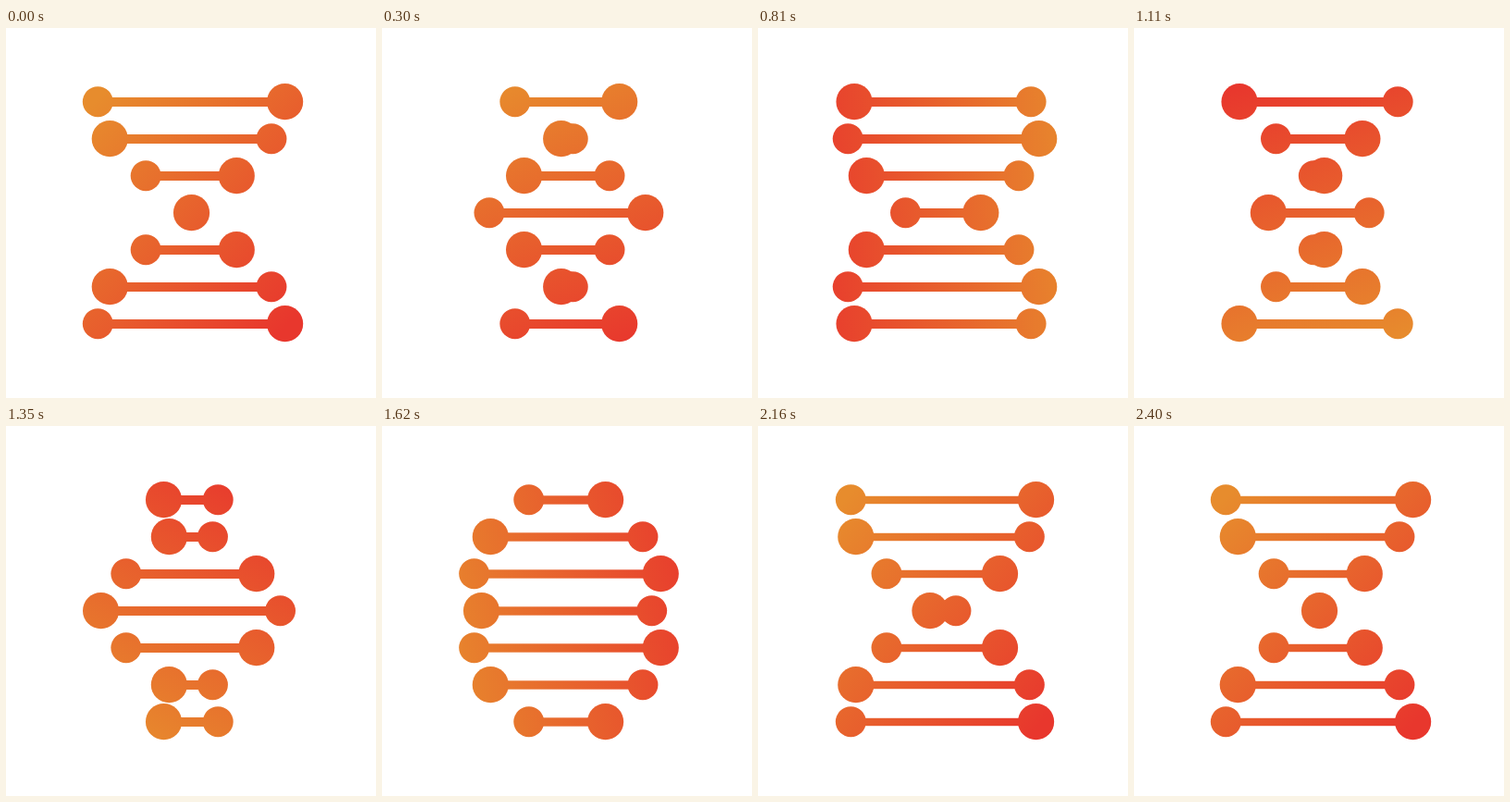
These frames come from a looping animation (400 px wide and 400 px high, 4460 ms). An HTML page with a canvas:

```html
<!DOCTYPE html>
<html lang="en">
<head>
<meta charset="utf-8">
<title>Turning helix</title>
<style>
  html, body { margin: 0; width: 100%; height: 100%; overflow: hidden; background: #fff; }
  canvas { display: block; width: 400px; height: 400px; }
</style>
</head>
<body>
<canvas id="stage" width="400" height="400"></canvas>
<script>
const ctx = document.getElementById('stage').getContext('2d');
const LOOP = 4460, TURN = 2400, STEP = 30;
const RAD = Math.PI / 180;
const BIG = 19.6, SMALL = 16.5;
const TWIST = [0, 30.3, 61, 90.3]; // degrees, outer row to middle row

const clamp = v => Math.min(1, Math.max(0, v));

function bezier(x1, y1, x2, y2) {
  const at = (s, a, b) => 3 * (1 - s) ** 2 * s * a + 3 * (1 - s) * s * s * b + s ** 3;
  return x => {
    if (x <= 0 || x >= 1) return clamp(x);
    let lo = 0, hi = 1;
    for (let i = 0; i < 30; i++) {
      const mid = (lo + hi) / 2;
      if (at(mid, x1, x2) < x) lo = mid; else hi = mid;
    }
    return at(lo, y1, y2);
  };
}

const spin = bezier(0.167, 0.179, 0.683, 1);
const sweep = bezier(0.28, 0, 0.49, 1);

function tint(angle) {
  const dx = 158 * Math.cos(angle * RAD), dy = 158 * Math.sin(angle * RAD);
  const g = ctx.createLinearGradient(200 - dx, 200 - dy, 200 + dx, 200 + dy);
  g.addColorStop(0, '#e78c2d');
  g.addColorStop(1, '#e8372d');
  return g;
}

function disc(x, y, r) {
  ctx.beginPath();
  ctx.arc(x, y, r, 0, 2 * Math.PI);
  ctx.fill();
}

function draw(t) {
  const p = clamp(t / TURN);
  const theta = 360 * spin(p);
  const reach = 101.2 + 3.2 * Math.sin(Math.PI * clamp((t - 290) / 800));
  const bar = 10 - 1.6 * clamp((t - 1400) / 550);

  ctx.fillStyle = '#fff';
  ctx.fillRect(0, 0, 400, 400);
  ctx.fillStyle = tint(43 + 360 * sweep(p));

  for (let row = 0; row < 7; row++) {
    const k = Math.min(row, 6 - row);
    const side = k % 2 ? -1 : 1;
    const off = side * reach * Math.cos((theta + TWIST[k]) * RAD);
    const big = 200 + off * 1.004, small = 200 - off * 0.995;
    const y = 80 + 40 * row;
    ctx.fillRect(Math.min(big, small), y - bar / 2, Math.abs(big - small), bar);
    disc(small, y - 0.3, SMALL);
    disc(big, y - 0.3, BIG);
  }
}

const start = performance.now();
function tick() {
  const t = (performance.now() - start) % LOOP;
  draw(Math.floor(t / STEP) * STEP);
  requestAnimationFrame(tick);
}
tick();
</script>
</body>
</html>
```
